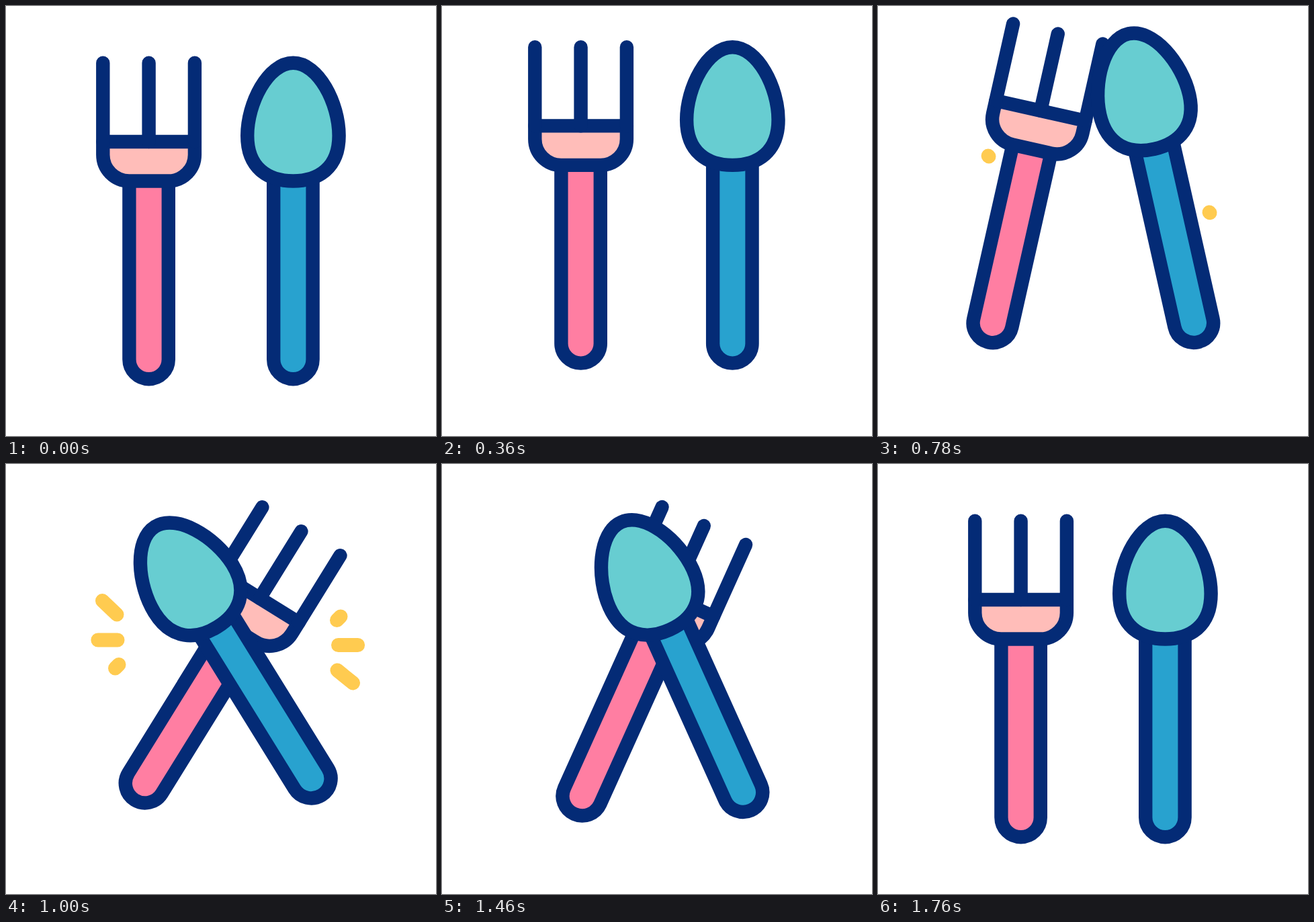
Animation of 640x640 px, one loop 2.4 s. Source, as an HTML page:

```html
<!DOCTYPE html>
<html lang="en">
<head>
<meta charset="utf-8">
<title>Fork and spoon</title>
<style>
  html, body { margin: 0; width: 100%; height: 100%; overflow: hidden; background: #fff; }
  svg { display: block; width: 100vw; height: 100vh; }
  g { fill: none; stroke: #042b76; stroke-width: 20.4; stroke-linecap: round; stroke-linejoin: round; }
  #sparks { stroke: #ffcb50; stroke-width: 21; }
</style>
</head>
<body>
<svg viewBox="0 0 640 640">
  <g id="sparks"></g>
  <!-- both pieces are drawn around their own centre -->
  <g id="fork">
    <path fill="#ff7ea2" stroke-linecap="butt" d="M-29.2-59.5V206a29.2 29.2 0 0 0 58.4 0V-59.5"/>
    <path fill="#ffbdb9" d="M-68.3-118V-98.5a39 39 0 0 0 39 39H29.3a39 39 0 0 0 39-39V-118Z"/>
    <path d="M-68.3-235.2V-118M0-235.2V-118M68.3-235.2V-118"/>
  </g>
  <g id="spoon">
    <path fill="#28a2cf" stroke-linecap="butt" d="M-29.2-65V206a29.2 29.2 0 0 0 58.4 0V-65"/>
    <path fill="#67cdd1" d="M0-235.2C37.6-235.2 68.2-175 68.2-127S37.6-59.5 0-59.5S-68.2-79-68.2-127S-37.6-235.2 0-235.2Z"/>
  </g>
</svg>
<script>
const LOOP = 2400;
const get = id => document.getElementById(id);
const mix = (a, b, k) => a + (b - a) * k;

// eased progress from time a to time b
function ease(t, a, b) {
  const u = Math.min(1, Math.max(0, (t - a) / (b - a)));
  return u * u * (3 - 2 * u);
}

// x: resting place, bow: sideways bend of the lift, (cx, cy): crossed place
const pieces = [
  { el: get('fork'), x: 212.6, bow: -17, cx: 321.1, cy: 301.8, turn: 32.6 },
  { el: get('spoon'), x: 427.4, bow: 14, cx: 341.4, cy: 294.3, turn: -32.6 }
];

// inner end, outer end, start time
const sparks = [
  [165, 224, 143.5, 203.5, 760],
  [166, 262, 136.5, 262, 845],
  [168, 298.5, 147, 319.5, 945],
  [493, 307, 516.5, 326, 760],
  [494.5, 269.5, 524, 269.5, 845],
  [492.5, 232.5, 513.5, 211.5, 945]
].map(spark => {
  const el = document.createElementNS('http://www.w3.org/2000/svg', 'path');
  get('sparks').append(el);
  return { el, spark };
});

function draw(t) {
  const lift = ease(t, 0, 750);
  const cross = ease(t, 750, 1041);
  const spin = ease(t, 586, 1044);
  const back = ease(t, 1312, 1762);

  for (const p of pieces) {
    const bend = 3 * (1 - lift) * lift * lift * p.bow;
    const x = mix(mix(p.x + bend, p.cx, cross), p.x, back);
    const y = mix(mix(320 - 50 * lift, p.cy, cross), 320, back);
    const angle = p.turn * spin * (1 - back);
    p.el.setAttribute('transform', `translate(${x} ${y}) rotate(${angle})`);
  }

  for (const { el, spark: [x1, y1, x2, y2, start] } of sparks) {
    const head = ease(t, start, start + 167);
    const tail = ease(t, start + 273, start + 440);
    const point = k => `${mix(x1, x2, k)} ${mix(y1, y2, k)}`;
    el.setAttribute('d', head > 0 && tail < 1 ? `M${point(tail)}L${point(head)}` : '');
  }
}

const begin = performance.now();
function tick() {
  draw((performance.now() - begin) % LOOP);
  requestAnimationFrame(tick);
}
draw(0);
tick();
</script>
</body>
</html>
```
